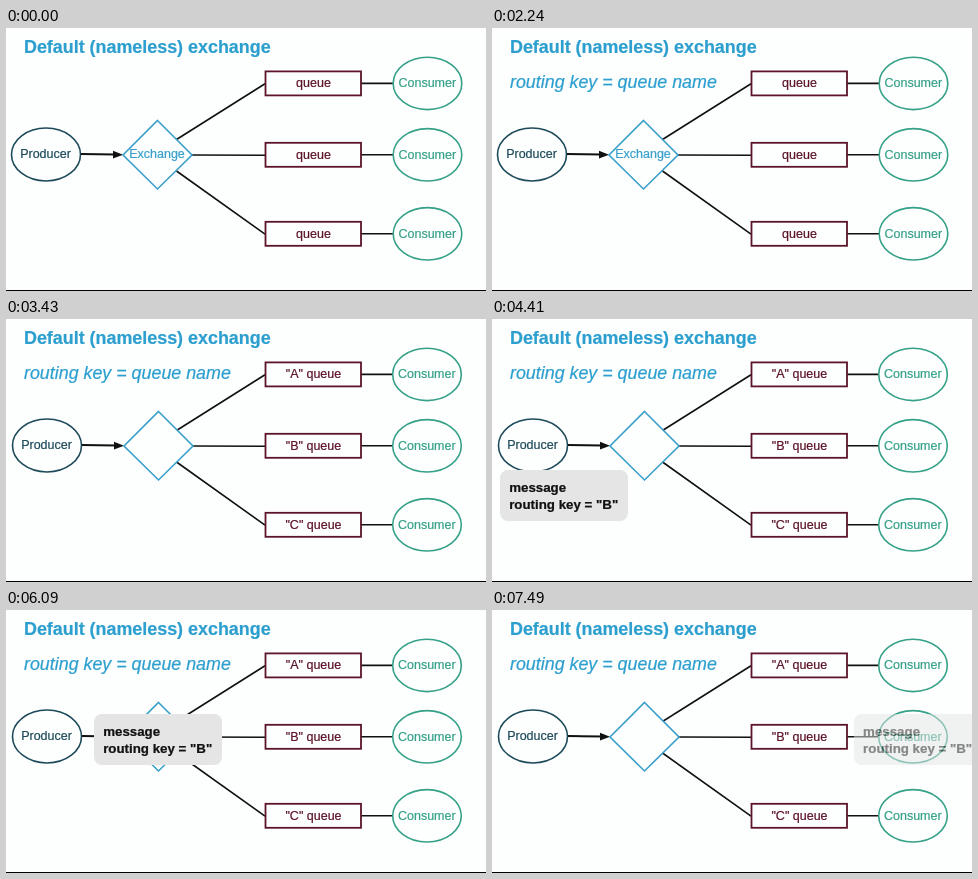
These frames come from a looping animation (480x263 px, 7.56 s). An HTML page:

```html
<!DOCTYPE html>
<html lang="en">
<head>
<meta charset="utf-8">
<title>Default exchange</title>
<style>
  html, body { margin: 0; width: 100%; height: 100%; overflow: hidden; background: #fdfefe; }
  svg { display: block; width: 100vw; height: 100vh; }
  text { font: 12.5px "Liberation Sans", Arial, sans-serif; fill: currentColor; stroke: currentColor; stroke-width: .22; }
  .mid { text-anchor: middle; }
  .title { font-size: 17.9px; font-weight: bold; color: #2c9fcf; }
  .rule { font-size: 17.85px; font-style: italic; color: #2c9fcf; }
  .message text { font-size: 13.3px; font-weight: bold; color: #111; }
  .shape { fill: #fdfefe; stroke: currentColor; stroke-width: 1.6; }
  .wire { stroke: #111; stroke-width: 1.6; }
  .producer { color: #1d4a5a; }
  .exchange { color: #389fcb; }
  .queue { color: #5c1428; }
  .queue.shape { stroke-width: 1.8; }
  .consumer { color: #35a188; }
</style>
</head>
<body>
<svg viewBox="0 0 480 263" preserveAspectRatio="none">
  <text class="title" x="18" y="25">Default (nameless) exchange</text>
  <text class="rule" id="rule" x="18" y="60">routing key = queue name</text>
  <g id="rows"></g>
  <g id="left">
    <ellipse class="shape producer" cx="40" cy="126.5" rx="34.5" ry="26.5"/>
    <text class="mid producer" x="39.5" y="130">Producer</text>
    <path class="wire" d="M75 126L109 126.6" style="stroke-width:2"/>
    <path d="M107 122.7L117 126.7L107 130.5Z" fill="#111"/>
    <path class="shape exchange" d="M151.5 92.5L186 127L151.5 161L117 127Z"/>
    <text class="mid exchange" id="exchangeName" x="151" y="130">Exchange</text>
  </g>
  <g class="message" id="message">
    <rect width="128" height="51" rx="8" fill="#e5e5e5"/>
    <text x="9.2" y="22">message</text>
    <text x="9.2" y="39">routing key = "B"</text>
  </g>
  <rect y="262" width="480" height="1"/>
</svg>
<script>
const LOOP = 7560, STEP = 70;
const $ = id => document.getElementById(id);

$('rows').innerHTML = [['A', 55.4, 111.5], ['B', 126.8, 127], ['C', 205.8, 143]].map(([name, y, from]) => `
  <path class="wire" d="M${name === 'B' ? 186 : 170.5} ${from}L259 ${y + .4}M355 ${y}H387"/>
  <rect class="shape queue" x="259.5" y="${y - 12}" width="95.5" height="24"/>
  <text class="mid queue plain" x="307.5" y="${y + 4}">queue</text>
  <text class="mid queue named" x="307.5" y="${y + 4}">"${name}" queue</text>
  <g class="right">
    <ellipse class="shape consumer" cx="421.5" cy="${y}" rx="34.3" ry="26.2"/>
    <text class="mid consumer" x="421.3" y="${y + 4}">Consumer</text>
  </g>`).join('');

const ramp = (t, start, end) => Math.min(1, Math.max(0, (t - start) / (end - start)));
const ease = p => p * p * (3 - 2 * p);
const setAll = (selector, name, value) =>
  document.querySelectorAll(selector).forEach(el => el.setAttribute(name, value));

// Start, end, dx and dy of each leg: exchange, queue, consumer
const legs = [[5430, 5960, 80, -47], [6160, 6690, 154, 0], [6840, 7500, 120, 0]];

function draw(time) {
  const t = Math.floor(time % LOOP / STEP) * STEP;
  const named = ramp(t, 2660, 3010);
  let x = 8, y = 151;
  for (const [start, end, dx, dy] of legs) {
    const p = ease(ramp(t, start, end));
    x += dx * p;
    y += dy * p;
  }
  $('rule').setAttribute('opacity', ramp(t, 1400, 1820));
  setAll('.plain, #exchangeName', 'opacity', 1 - named);
  setAll('.named', 'opacity', named);
  $('left').setAttribute('transform', `translate(${named} 0)`);
  setAll('.right', 'transform', `translate(${-named / 2} 0)`);
  $('message').setAttribute('transform', `translate(${x} ${y})`);
  $('message').setAttribute('opacity', ramp(t, 3780, 4200) * (1 - ramp(t, 7280, 7700)));
}

function tick() {
  draw(performance.now());
  requestAnimationFrame(tick);
}
tick();
</script>
</body>
</html>
```
